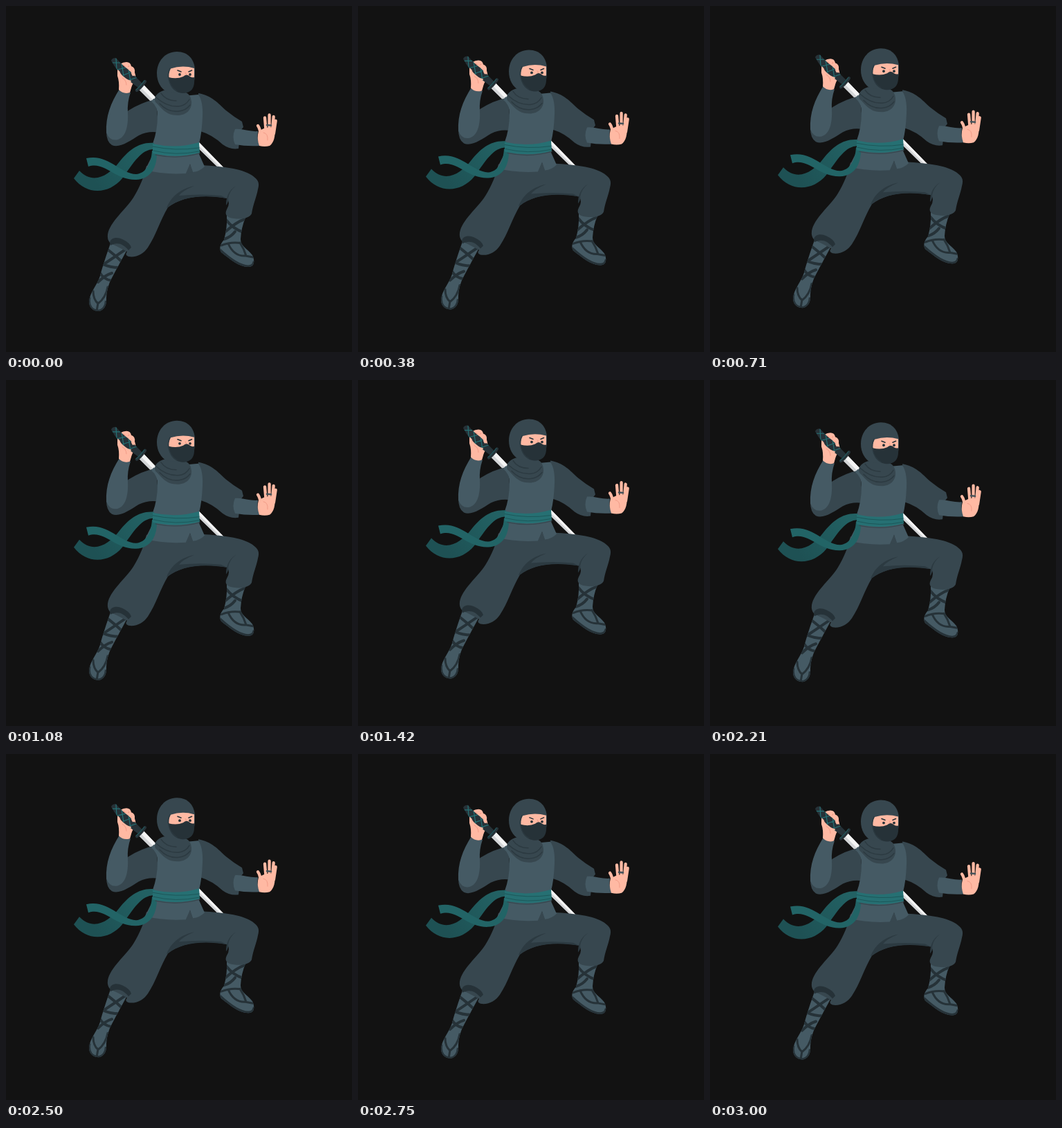
These frames come from a looping animation (500 by 500 pixels, 3040 ms). An HTML page with a canvas:

```html
<!DOCTYPE html>
<html lang="en">
<head>
<meta charset="utf-8">
<title>Hovering ninja</title>
<style>
html, body { margin: 0; width: 100%; height: 100%; overflow: hidden; background: #121212; }
canvas { display: block; width: 500px; height: 500px; }
</style>
</head>
<body>
<canvas id="stage"></canvas>
<script>
const canvas = document.getElementById('stage');
const ctx = canvas.getContext('2d');
const ratio = window.devicePixelRatio || 1;
canvas.width = canvas.height = 500 * ratio;

const LOOP = 3040, PEAK = 1460, SPEED = 1 / 150;
const BACK = '#121212', DARK = '#263238', CLOTH = '#37474f', LIGHT = '#455a64';
const FOLD = '#2c3a41', TEAL = '#267073', SKIN = '#ffb9a3', BLUSH = '#ee9580';

const paths = {};
const shape = d => paths[d] || (paths[d] = new Path2D(d));

function fill(color, d) {
  ctx.fillStyle = color;
  ctx.fill(shape(d));
}

function line(color, width, d) {
  ctx.strokeStyle = color;
  ctx.lineWidth = width;
  ctx.stroke(shape(d));
}

function dot(color, x, y, r) {
  ctx.fillStyle = color;
  ctx.beginPath();
  ctx.arc(x, y, r, 0, Math.PI * 2);
  ctx.fill();
}

// Runs paint with drawing limited to the given outline
function within(d, paint) {
  ctx.save();
  ctx.clip(shape(d));
  paint();
  ctx.restore();
}

function blade() {
  fill('#d3d5d7', 'M190 119 L199 114 Q257 175 317 236 L311 238 Q250 179 190 119Z');
  fill('#f4f4f4', 'M194 117 L199 114 Q257 175 317 236 L314 237 Q253 177 194 117Z');
}

function ribbons() {
  const fade = ctx.createLinearGradient(130, 258, 200, 203);
  fade.addColorStop(0, '#1e5154');
  fade.addColorStop(1, '#226163');
  fill(fade, 'M214 198 C192 196 177 209 164 225 C149 245 126 259 106 238 L98 249 C117 274 149 272 168 249 C185 226 195 207 214 207Z');
  fill('#226466', 'M116 220 C148 213 164 242 188 243 C202 242 210 228 211 209 L218 209 C219 234 209 250 188 251 C157 252 143 224 119 232Z');
}

function leftLeg() {
  const leg = 'M151 343 C146 357 139 378 136 390 C132 403 121 414 120 427 C120 437 127 441 134 441 C141 440 145 434 145 425 C145 414 147 407 150 399 C158 383 166 369 175 352Z';
  fill(LIGHT, leg);
  within(leg, () => {
    line(DARK, 4, 'M147 352 Q160 362 170 372 M174 351 Q158 362 140 374 M140 373 Q150 378 164 378 M135 384 Q140 395 153 397 M153 386 Q143 389 133 399');
    line(DARK, 3, 'M126 412 Q126 424 133 430 Q144 422 147 406 M133 429 L131 441');
    line(DARK, 2.6, 'M121 422 C119 434 125 440 134 440 C141 439 144 432 144 427');
  });
}

function rightLeg() {
  const leg = 'M319 303 Q320 320 315 338 C309 344 308 351 311 356 C324 366 338 378 351 377 C359 377 360 368 356 360 C348 350 339 347 339 337 Q340 320 346 306Z';
  fill(LIGHT, leg);
  within(leg, () => {
    line(DARK, 4, 'M318 309 Q328 322 343 327 M345 308 Q333 312 316 327 M315 337 Q325 334 331 326');
    line(DARK, 3, 'M311 346 Q326 340 341 343 M321 343 C327 357 336 362 347 361 Q344 351 338 342 M346 361 L357 363');
    line(DARK, 3.2, 'M309 352 C323 365 339 376 350 376 Q357 376 358 370');
  });
}

function trousers() {
  fill(CLOTH, 'M203 231 C200 245 194 261 184 277 C173 294 150 312 147 330 Q146 337 150 342 L175 355 Q171 360 177 362 C188 364 199 358 205 349 C217 331 223 309 234 291 C252 276 286 271 319 278 Q325 284 319 294 C315 302 320 306 329 307 C342 309 352 306 355 300 C357 287 362 276 364 265 C367 255 364 251 356 245 C339 234 312 232 284 230Z');
  fill(FOLD, 'M232 292 C237 279 248 265 272 260 Q255 267 250 274 Q282 271 311 274 L319 278 C283 272 252 276 232 292Z');
  fill(FOLD, 'M332 260 C321 267 318 277 318 288 Q322 283 321 278 Q323 267 332 260Z');
  fill(DARK, 'M150 342 C151 335 160 333 168 337 Q179 342 181 349 L177 353 C169 343 160 341 151 346Z');
}

function farArm() {
  fill(CLOTH, 'M278 126 C298 130 306 140 318 151 Q329 160 341 167 L343 175 L339 180 L336 206 Q324 208 313 200 Q298 186 281 181Z');
  fill(LIGHT, 'M331 178 C342 177 353 182 364 181 Q362 193 367 202 Q347 203 331 200 Q326 189 331 178Z');
}

function openHand() {
  line(SKIN, 4.3, 'M364 173 Q367 177 368 186 M374 161.5 L375.5 179 M380.6 157.5 L380.5 179 M386.7 160 L385 179 M389.7 166 L387 184');
  fill(SKIN, 'M366 181 Q374 174 388 176 C390 187 387 198 381 202 Q374 204 366 202 Q362 191 365 181Z');
  line(BLUSH, .8, 'M372 183 Q379 184 378 194');
  line('#46545b', 2.6, 'M377 172 L383 172.5');
}

function swordArm() {
  fill(CLOTH, 'M177 151 Q196 139 216 135 L222 183 Q206 180 192 187 C179 195 164 206 153 201 Q145 196 145 181Z');
  fill(LIGHT, 'M164 120 Q171 127 180 125 Q175 139 176 154 C177 174 173 189 162 193 Q150 196 145 183 C144 159 151 141 164 120Z');
}

function torso() {
  fill(LIGHT, 'M213 134 L278 128 Q285 138 284 160 Q283 184 279 199 L279 214 L287 232 Q280 239 270 240 L266 229 L260 242 Q228 244 201 237 L213 213 L212 199 Q219 180 219 158 Q219 145 210 138Z');
  fill(CLOTH, 'M266 228 L260 242 L270 240Z');
}

function belt() {
  fill(TEAL, 'M212 199 Q246 207 279 197 L280 212 Q247 221 212 213Z');
  line('#1d5759', 1, 'M212 203 Q245 210 279 205 M213 209 Q245 217 279 210');
  line(CLOTH, 1.3, 'M216 215 Q248 222 280 213');
}

function scarf() {
  fill(CLOTH, 'M228 122 C217 126 213 132 216 139 C225 147 230 158 248 158 C261 158 269 149 268 138 Q267 128 260 125Z');
  line(FOLD, 1.5, 'M217 132 Q232 146 249 145 Q260 144 265 135 M222 141 Q234 154 250 152 Q260 151 266 143 M224 126 Q231 137 246 137');
}

function head() {
  fill(CLOTH, 'M247 66 C230 66 218 80 218 97 C218 110 224 119 232 124 L257 126 C271 123 273 109 273 94 C273 77 263 66 247 66Z');
  fill(SKIN, 'M238 90.5 Q255 85 272 90 L272 106 L236 106 Q234 98 238 90.5Z');
  fill(DARK, 'M235 103 Q247 106 256 102 Q261 97 266 102 Q269 104 272 103 C273 116 270 125 257 126 C246 126 236 119 235 103Z');
  line(FOLD, 1.3, 'M237 90 Q233 98 235 105 Q237 117 247 123');
  line(DARK, 1.6, 'M248 93 L253 95 M264 95 L268.5 93');
  dot(DARK, 251, 99, 1.9);
  dot(DARK, 266, 99, 1.9);
  line(BLUSH, 1, 'M259 96 Q261 97 260 99');
}

function grip() {
  fill(SKIN, 'M161 91 Q164 81 174 81 Q180 81 181 87 Q187 89 186 96 Q189 104 185 110 C181 115 181 120 179 125 Q170 128 163 121 Q164 109 161 101Z');
  line(BLUSH, 2, 'M171 86 L177 87 M177 91 L181 93 M181 97 L184 99');
  const handle = 'M152 79 Q153 75 159 75 Q167 85 177 92 L197 112 L191 118 L175 106 Q161 96 152 79Z';
  fill(DARK, handle);
  within(handle, () => {
    line('#247174', 1.2, 'M154 82 L165 82 M159 76 L160 92 M161 92 L173 89 M167 83 L170 101 M169 100 L183 95 M177 91 L180 110 M178 107 L190 103');
  });
  fill(SKIN, 'M161 92 Q165 93 166 100 Q173 106 181 108 L178 115 L164 112Z');
  line(SKIN, 4, 'M172 84 L175 86 M178 90 L180 92 M183 97 L184 99');
  line(BLUSH, .8, 'M168 104 Q174 107 174 114');
  line(DARK, 4.2, 'M189 122 Q195 118 201 109');
  line('#22585c', 1.2, 'M188 121 Q193 117 200 108');
}

const figure = [blade, leftLeg, rightLeg, trousers, farArm, openHand,
  swordArm, torso, ribbons, belt, scarf, head, grip];

// Steady rise and fall, lowest at the ends of the loop
const lift = t => (PEAK - Math.abs(t - PEAK)) * SPEED;

const start = performance.now();

function frame(now) {
  const t = Math.max(0, now - start) % LOOP;
  ctx.setTransform(ratio, 0, 0, ratio, 0, 0);
  ctx.fillStyle = BACK;
  ctx.fillRect(0, 0, 500, 500);
  ctx.translate(0, -lift(t));
  ctx.lineCap = ctx.lineJoin = 'round';
  for (const part of figure) part();
  requestAnimationFrame(frame);
}
frame(start);
</script>
</body>
</html>
```
